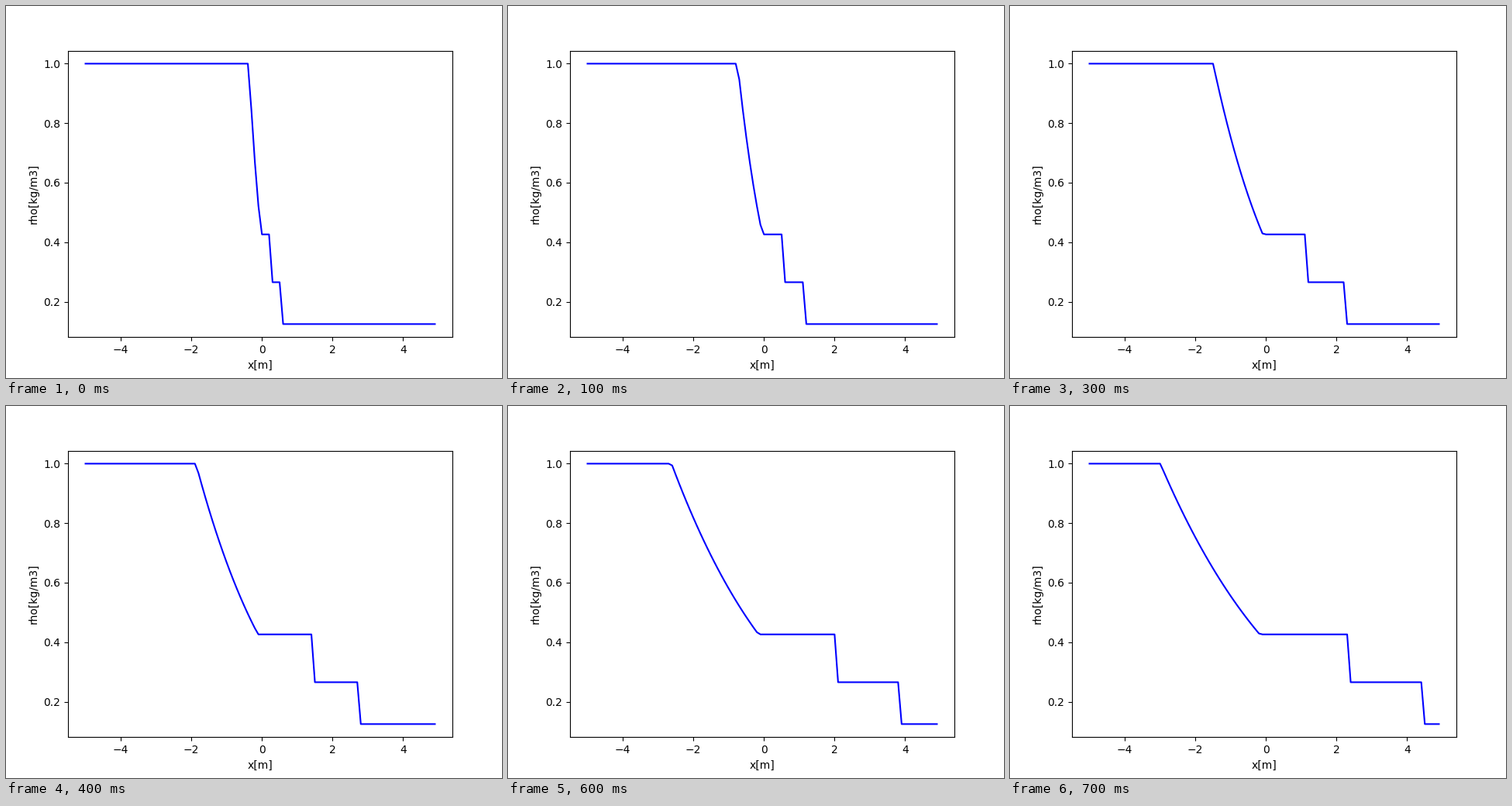
These frames come from a looping animation (640 by 480 pixels, 0.8 s). A matplotlib script:

```python
import numpy as np
import matplotlib.pyplot as plt
from matplotlib.animation import FuncAnimation

FRAMES, INTERVAL = 8, 100
GAMMA = 1.4
RHO_LEFT, RHO_RIGHT = 1.0, 0.125
P_LEFT, P_RIGHT = 1.0e5, 1.0e4
P_STAR = 0.30313 * P_LEFT  # pressure between the fan and the shock

# Exact Sod shock tube: states and wave speeds
MU = (GAMMA - 1) / (GAMMA + 1)
C_LEFT = np.sqrt(GAMMA * P_LEFT / RHO_LEFT)
C_RIGHT = np.sqrt(GAMMA * P_RIGHT / RHO_RIGHT)
C_STAR = C_LEFT * (P_STAR / P_LEFT) ** ((GAMMA - 1) / (2 * GAMMA))
RATIO = P_STAR / P_RIGHT
RHO_FAN_END = RHO_LEFT * (P_STAR / P_LEFT) ** (1 / GAMMA)
RHO_SHOCKED = RHO_RIGHT * (RATIO + MU) / (MU * RATIO + 1)
CONTACT = 2 / (GAMMA - 1) * (C_LEFT - C_STAR)
SHOCK = C_RIGHT * np.sqrt((GAMMA + 1) / (2 * GAMMA) * (RATIO - 1) + 1)
HEAD, TAIL = -C_LEFT, CONTACT - C_STAR


def density(x, t):
    speed = x / t
    fan_speed = np.clip(speed, HEAD, TAIL)
    fan = RHO_LEFT * (2 / (GAMMA + 1) - MU * fan_speed / C_LEFT) ** (2 / (GAMMA - 1))
    return np.select(
        [speed < HEAD, speed < TAIL, speed < CONTACT, speed < SHOCK],
        [RHO_LEFT, fan, RHO_FAN_END, RHO_SHOCKED],
        RHO_RIGHT,
    )


x = np.arange(-50, 50) / 10
fig, ax = plt.subplots(figsize=(6.4, 4.8), dpi=100)
line, = ax.plot(x, density(x, 1e-3), color="blue")
ax.set_xlabel("x[m]")
ax.set_ylabel("rho[kg/m3]")


def update(frame):
    line.set_ydata(density(x, (frame + 1) * 1e-3))
    return line,


anim = FuncAnimation(fig, update, frames=FRAMES, interval=INTERVAL, repeat=True)
plt.show()
```
